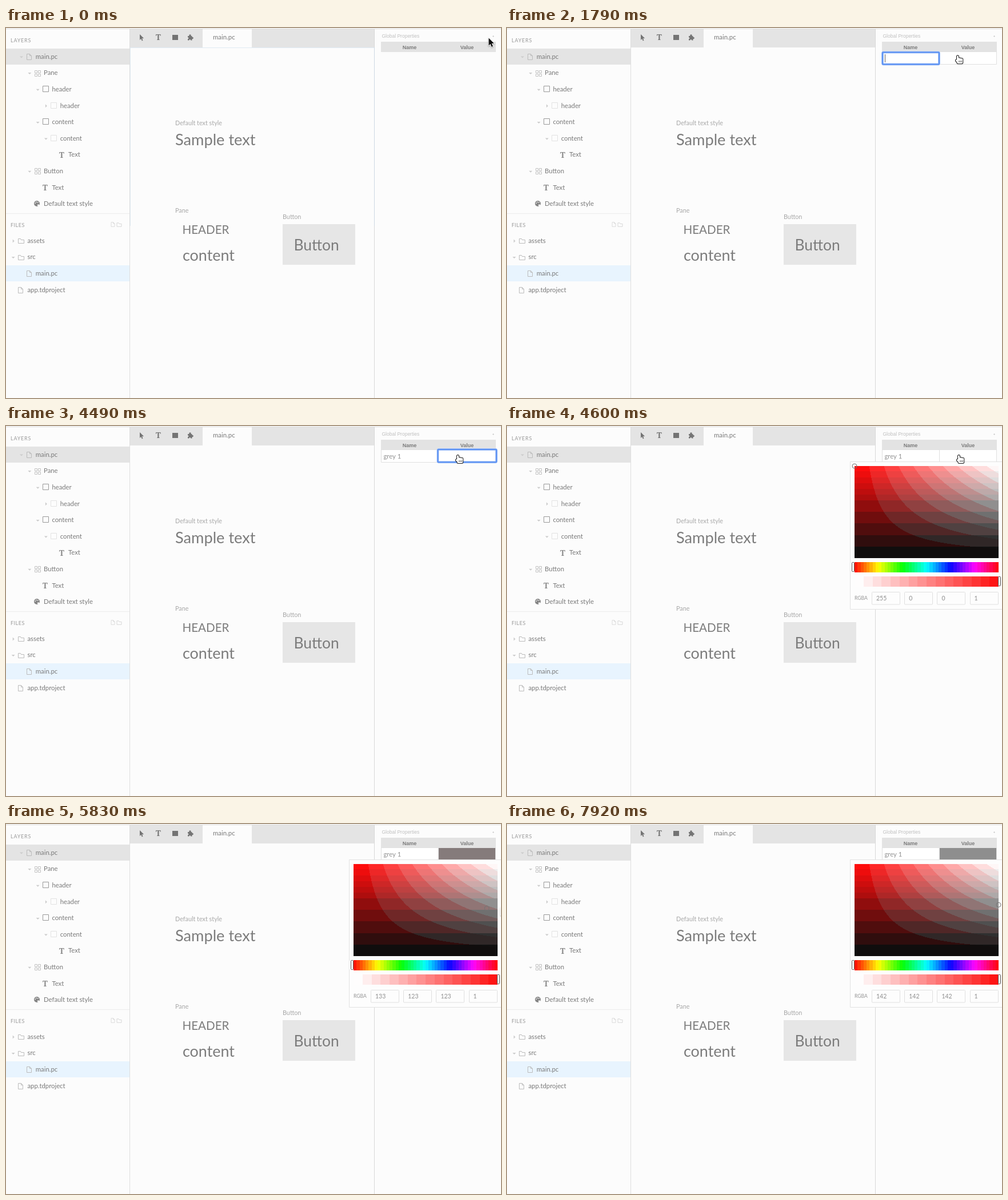
An HTML page with a canvas that plays this animation: 866x647 px, repeating every 8000 ms.

```html
<!DOCTYPE html>
<html lang="en">
<head>
<meta charset="utf-8">
<title>Global color editor</title>
<style>
  html, body { margin: 0; width: 100%; height: 100%; overflow: hidden; background: #fcfcfc; }
  canvas { display: block; }
</style>
</head>
<body>
<canvas id="stage" width="866" height="647"></canvas>
<script>
const LOOP = 8000;
const ctx = document.getElementById('stage').getContext('2d');
const SANS = 'Lato, "Open Sans", sans-serif';
const ARIAL = '"Liberation Sans", sans-serif';
const INK = '#7a7a7a', PALE = '#a8a8a8', LINE = '#bcbcbc', BAR = '#e4e4e4', PAPER = '#fcfcfc';
const FIELD = { x: 608, y: 70, w: 252, h: 161 };

const SHOW_MENU = 680, ADD_ROW = 1610, FOCUS_VALUE = 4490, SHOW_PICKER = 4600, FIRST_PICK = 5190;
const KEYSTROKES = [2860, 3100, 3100, 3310, 3430, 3670];

// Each leg moves in equal steps: first step, last step, count, end point.
const CURSOR = {
  start: { x: 844, y: 17 },
  legs: [
    { from: 90, to: 330, steps: 3, x: 849.5, y: 14.3 },
    { from: 1150, to: 1610, steps: 5, x: 811, y: 45 },
    { from: 1790, to: 2140, steps: 4, x: 721, y: 55.5 },
    { from: 4020, to: 4490, steps: 5, x: 790.5, y: 50.5 },
    { from: 4840, to: 4920, steps: 2, x: 757, y: 211 },
    { from: 5300, to: 5480, steps: 3, x: 807, y: 163 },
    { from: 5600, to: 5950, steps: 4, x: 885, y: 140 }
  ]
};
const PICK = {
  start: { x: 608, y: 70 },
  legs: [
    { from: FIRST_PICK, to: FIRST_PICK, steps: 1, x: 757, y: 211 },
    { from: 5300, to: 5480, steps: 3, x: 785, y: 169 },
    { from: 5600, to: 5950, steps: 4, x: 860, y: 140 },
    { from: 6180, to: 6500, steps: 4, x: 860, y: 154 },
    { from: 6970, to: 7210, steps: 3, x: 860, y: 160 },
    { from: 7450, to: 7920, steps: 5, x: 860, y: 141.3 }
  ]
};

function follow({ start, legs }, t) {
  let pos = start;
  for (const leg of legs) {
    if (t < leg.from) break;
    const gap = (leg.to - leg.from) / (leg.steps - 1 || 1) || 1;
    // Half a gap of slack absorbs uneven step times.
    const done = t >= leg.to ? 1 : Math.min(1, (Math.floor((t - leg.from) / gap + .1) + 1) / leg.steps);
    pos = { x: pos.x + (leg.x - pos.x) * done, y: pos.y + (leg.y - pos.y) * done };
  }
  return pos;
}

const within = (t, from, to) => t >= from && t < to;

function box(x, y, w, h, color) {
  ctx.fillStyle = color;
  ctx.fillRect(x, y, w, h);
}

function frame(x, y, w, h, color, width = 1, radius = 0) {
  ctx.strokeStyle = color;
  ctx.lineWidth = width;
  ctx.beginPath();
  ctx.roundRect(x, y, w, h, radius);
  ctx.stroke();
}

function disc(x, y, r, color) {
  ctx.fillStyle = color;
  ctx.beginPath();
  ctx.arc(x, y, r, 0, Math.PI * 2);
  ctx.fill();
}

function text(str, x, y, size, color = INK, opt = {}) {
  ctx.font = `${opt.weight || 400} ${size}px ${opt.family || SANS}`;
  ctx.letterSpacing = `${opt.gap || 0}px`;
  ctx.textAlign = opt.align || 'left';
  ctx.fillStyle = color;
  ctx.fillText(str, x, y);
}

// Draws an SVG path at a place and scale.
function shape(d, x, y, { fill, stroke, width = 1, scale = 1 }) {
  ctx.save();
  ctx.translate(x, y);
  ctx.scale(scale, scale);
  const path = new Path2D(d);
  ctx.lineJoin = 'round';
  ctx.lineWidth = width;
  if (stroke) { ctx.strokeStyle = stroke; ctx.stroke(path); }
  if (fill) { ctx.fillStyle = fill; ctx.fill(path); }
  ctx.restore();
}

// Icons are placed by their left edge and vertical centre.
const icons = {
  doc(x, y, scale = 1, stroke = LINE) {
    shape('M0-5H5L8-2V5H0ZM5-5V-2H8', x + .5, y + .5, { stroke, scale });
  },
  folder(x, y, scale = 1, stroke = LINE) {
    shape('M0-4H4L5-2H10V4H0Z', x + .5, y + .5, { stroke, scale });
  },
  parts(x, y) {
    for (const dx of [0, 6]) for (const dy of [-5, 1]) frame(x + dx + .5, y + dy + .5, 4, 4, '#c2c2c2');
  },
  square(x, y) { frame(x + .5, y - 5.5, 10, 10, '#999999'); },
  ghost(x, y) { frame(x + .5, y - 5.5, 10, 10, '#e2e2e2'); },
  type(x, y, color = '#888888') {
    text('T', x, y + 4.7, 13.5, color, { family: '"Noto Serif", serif', weight: 700 });
  },
  palette(x, y) {
    disc(x - 1 + 5, y, 5, '#858585');
    for (const a of [3.4, 4.4, 5.4]) disc(x + 4 + 2.8 * Math.cos(a), y + 2.8 * Math.sin(a), .9, PAPER);
    disc(x + 6.5, y + 3, 1.7, PAPER);
  }
};

function chevron(x, y, open) {
  shape(open ? 'M-3-1H3L0 2Z' : 'M-1-3V3L2 0Z', x, y, { fill: '#cccccc' });
}

// Rows: label, icon, depth, then open or closed for branches
const LAYERS = [
  ['main.pc', 'doc', 0, 'open'], ['Pane', 'parts', 1, 'open'],
  ['header', 'square', 2, 'open'], ['header', 'ghost', 3, 'closed'],
  ['content', 'square', 2, 'open'], ['content', 'ghost', 3, 'open'], ['Text', 'type', 4],
  ['Button', 'parts', 1, 'open'], ['Text', 'type', 2], ['Default text style', 'palette', 1]
];
const FILES = [
  ['assets', 'folder', -1, 'closed'], ['src', 'folder', -1, 'open'],
  ['main.pc', 'doc', 0], ['app.tdproject', 'doc', -1]
];

function tree(rows, top) {
  rows.forEach(([label, icon, depth, state], i) => {
    const y = top + i * 28.6, x = 36 + depth * 14.3;
    if (state) chevron(x - 9, y + .5, state === 'open');
    icons[icon](Math.floor(x), Math.round(y));
    text(label, x + 15.8, y + 3.8, 11.3);
  });
}

function sidebar() {
  text('LAYERS', 8, 25, 9, '#9a9a9a', { gap: .8 });
  box(0, 36, 216, 28, BAR);
  tree(LAYERS, 50);
  box(0, 324, 216, 1, '#ededed');
  text('FILES', 8, 348, 9, '#9a9a9a', { gap: .5 });
  icons.doc(183.5, 343, .75, '#d0d0d0');
  icons.folder(193.5, 343.5, .8, '#d0d0d0');
  box(0, 415, 216, 28, '#e8f4fe');
  tree(FILES, 372);
  box(216, 2, 1, 645, '#dedede');
}

const ARROW = 'M0 0V13.2L3 10.4L5.1 15.4L7.4 14.4L5.3 9.6L9.4 9.4Z';

function toolbar() {
  const tool = '#747474';
  box(217, 2, 427, 32, BAR);
  box(344, 2, 86, 32, PAPER);
  shape(ARROW, 234, 11, { fill: tool, scale: .75 });
  icons.type(262, 16.5, tool);
  box(291, 12, 10, 9, tool);
  box(318, 14, 7.5, 7.5, tool);
  disc(322, 13, 1.8, tool);
  disc(326, 17.5, 1.8, tool);
  disc(318.3, 17.8, 1.2, BAR);
  disc(321.8, 21.2, 1.2, BAR);
  text('main.pc', 362, 20.2, 11.4);
}

function artboards(focused) {
  const big = '#7c7c7c';
  text('Default text style', 296, 170, 10.8, PALE);
  text('Sample text', 296, 205.3, 27.2, big);
  text('Pane', 296, 322.8, 10.8, PALE);
  text('HEADER', 308.5, 359.5, 20.6, big);
  text('content', 309, 406.5, 26.9, big);
  text('Button', 484, 333.8, 10.8, PALE);
  box(484, 343, 127, 71, '#e6e6e6');
  text('Button', 503.5, 388.7, 26.4, big);
  box(644, 2, 1, 645, '#d9d9d9');
  if (focused) {
    box(217, 34, 428, 1, '#dfeaf3');
    box(217, 34, 1, 312, '#e2ecf4');
    box(644, 34, 1, 312, '#cdd8e3');
  }
}

function ring(x, y, w, h) {
  frame(x, y, w, h, '#bcd3fb', 4, 2);
  frame(x, y, w, h, '#5f93f2', 2.6, 1);
}

function menu() {
  ctx.save();
  ctx.shadowColor = 'rgba(0,0,0,.35)';
  ctx.shadowBlur = 4;
  ctx.shadowOffsetY = 1;
  box(778.5, 28.5, 100, 20.5, '#fdfdfd');
  ctx.restore();
  frame(778.5, 28.5, 100, 20.5, '#d6d6d6');
  text('Color', 783, 42.3, 10.6, '#858585');
}

function properties(t) {
  text('Global Properties', 657.5, 17, 8.5, '#c0c0c0', { family: ARIAL });
  box(851, 14, 3, 1, '#d2d2d2');
  box(852, 13, 1, 3, '#d2d2d2');
  box(656, 24, 201, 18, '#e3e3e3');
  const head = { family: ARIAL, weight: 700, align: 'center' };
  text('Name', 706, 37, 9, INK, head);
  text('Value', 806.5, 37, 9, INK, head);
  if (within(t, SHOW_MENU, ADD_ROW)) menu();
  if (t >= ADD_ROW) row(t);
}

function row(t) {
  box(656, 42, 201, 22, '#ffffff');
  frame(656.5, 41.5, 200, 22, '#e0e0e0');
  box(756, 42, 1, 22, '#e0e0e0');
  if (t >= FIRST_PICK) {
    const [r, g] = pickedColor(t);
    box(757, 42, 99, 21, `rgb(${r},${g},${g})`);
  }
  if (t < FOCUS_VALUE) ring(657, 42.5, 99, 21);
  else if (t < SHOW_PICKER) ring(755.5, 41, 102.5, 22.3);

  const name = 'grey 1'.slice(0, KEYSTROKES.filter(key => key <= t).length);
  text(name, 660.5, 56.7, 11.3, '#929292');
  if (within(t, ADD_ROW, 2140) || within(t, 2620, 4020)) {
    box(Math.round(660.5 + ctx.measureText(name).width), 46, 1, 14, '#666666');
  }
}

function pickedColor(t) {
  const { x, y } = follow(PICK, t);
  const value = 255 * (FIELD.y + FIELD.h - y) / FIELD.h;
  return [Math.round(value), Math.round(value * (x - FIELD.x) / FIELD.w)];
}

// Saturation field, stepped into tone bands
const field = (() => {
  const c = document.createElement('canvas');
  c.width = FIELD.w;
  c.height = FIELD.h;
  const g = c.getContext('2d');
  const band = (n, size) => Math.min(255, (Math.floor(n / size) + .5) * size);
  for (let y = 0; y < FIELD.h; y++) {
    const v = 255 * (1 - (y + .5) / FIELD.h);
    const r = v < 160 ? band(v, 32) : Math.min(255, band(v, 16) + 6);
    for (let x = 0; x < FIELD.w; x++) {
      const low = Math.min(r, band(v * (x + .5) / FIELD.w, 26));
      g.fillStyle = `rgb(${r},${low},${low})`;
      g.fillRect(x, y, 1, 1);
    }
  }
  return c;
})();

function strip(y, count, color) {
  const edge = i => Math.round(FIELD.x + i * FIELD.w / count);
  for (let i = 0; i < count; i++) box(edge(i), y, edge(i + 1) - edge(i), 18, color(i / count));
}

function handle(x, y) {
  box(x, y, 4, 16, '#ffffff');
  frame(x, y, 4, 16, '#555555', 1, 1);
}

function picker(t) {
  box(600, 62, 270, 259, '#fdfdfd');
  frame(600.5, 62.5, 270, 258, '#e2e2e2');
  ctx.drawImage(field, FIELD.x, FIELD.y);
  strip(238, 48, p => `hsl(${p * 360 + 4},100%,51%)`);
  strip(263, 16, p => {
    const low = 253 - p * 248;
    return `rgb(254,${low},${low})`;
  });
  handle(603.5, 238.5);
  handle(859.5, 263.5);

  const [r, g] = pickedColor(t);
  text('RGBA', 608, 304, 8.6, '#959595');
  [r, g, g, 1].forEach((n, i) => {
    const x = 638.5 + i * 57.2;
    frame(Math.floor(x) + .5, 290.5, 49, 21.5, '#e0e0e0', 1, 1);
    text(String(n), x + 7.5, 304.8, 10.5, '#8e8e8e');
  });

  const { x, y } = follow(PICK, t);
  frame(x - 4, y - 4, 8, 8, '#747474', 1, 4);
}

const cursors = {
  arrow(x, y) {
    ctx.save();
    ctx.shadowColor = 'rgba(0,0,0,.35)';
    ctx.shadowBlur = 2;
    ctx.shadowOffsetY = 1;
    shape(ARROW, x + .5, y + .5, { stroke: '#ffffff', width: 2 });
    ctx.restore();
    shape(ARROW, x + .5, y + .5, { fill: '#111111' });
  },
  hand(x, y) {
    ctx.beginPath();
    ctx.roundRect(x - 1.5, y + .5, 3, 11, 1.5);
    for (let i = 0; i < 3; i++) ctx.roundRect(x + 1.4 + i * 2.4, y + 4.5 + i * .5, 2.6, 6, 1.3);
    ctx.roundRect(x - 3.5, y + 7.5, 4, 3.5, 1.5);
    ctx.roundRect(x - 1.2, y + 8, 10, 6.5, 2);
    ctx.strokeStyle = '#1a1a1a';
    ctx.lineWidth = 2;
    ctx.stroke();
    ctx.fillStyle = '#ffffff';
    ctx.fill();
    for (let i = 0; i < 3; i++) box(x + 2 + i * 2.2, y + 9.5, .8, 3, '#333333');
  },
  beam(x, y) {
    const d = 'M-3-7.5H-1L0-6.5L1-7.5H3M-3 7.5H-1L0 6.5L1 7.5H3M0-6.5V6.5M-2 3H2';
    shape(d, x, y, { stroke: '#ffffff', width: 3 });
    shape(d, x, y, { stroke: '#222222', width: 1.3 });
  }
};

// The pointer takes the form that suits what lies under it.
function pointer(t) {
  const { x, y } = follow(CURSOR, t);
  const overRow = t >= ADD_ROW && y < 64;
  const kind = !overRow ? 'arrow' : x > 757 ? 'hand' : 'beam';
  cursors[kind](x, y);
}

function draw(t) {
  box(0, 0, 866, 647, PAPER);
  box(0, 1, 866, 1, '#dedede');
  sidebar();
  toolbar();
  artboards(t < SHOW_MENU);
  properties(t);
  if (t >= SHOW_PICKER) picker(t);
  pointer(t);
}

function tick(now) {
  draw(now % LOOP);
  requestAnimationFrame(tick);
}
draw(0);
requestAnimationFrame(tick);
</script>
</body>
</html>
```
